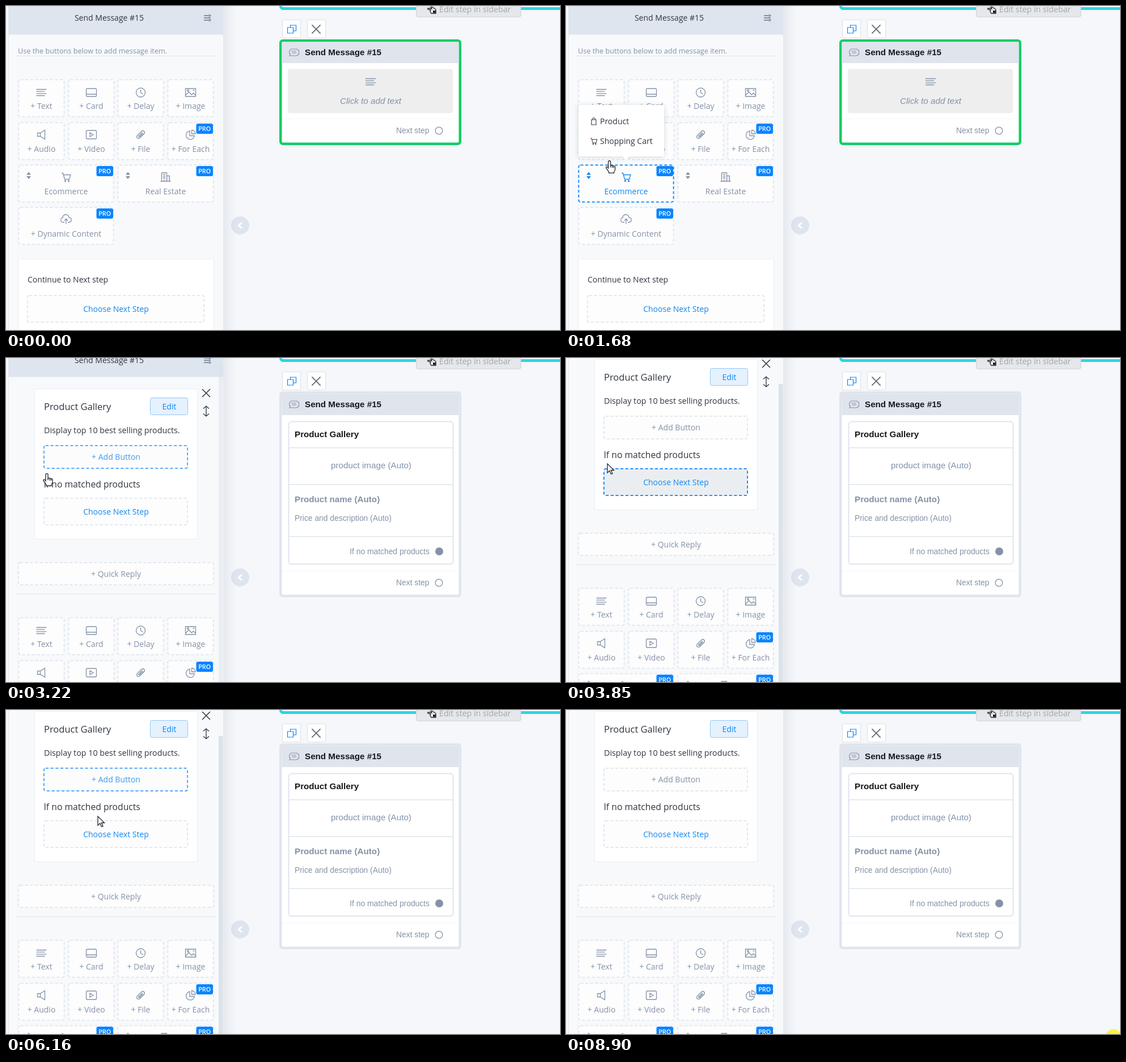
An HTML page with a canvas that plays this animation: 977x573 px, repeating every 8.97 s.

```html
<!DOCTYPE html>
<html>
<head>
<meta charset="utf-8">
<style>
html, body { margin: 0; width: 100%; height: 100%; overflow: hidden; background: #f5f7fa; }
canvas { display: block; }
</style>
</head>
<body>
<canvas id="stage" width="977" height="573"></canvas>
<script>
const c = document.getElementById('stage').getContext('2d');
const LOOP = 8970, SHIFT = 346;
const GRAY = '#8392a7', BLUE = '#0a84ff', LINK = '#0f87f0', DARK = '#2f3640', LINE = '#dfe5ee';
const SANS = '"Open Sans", sans-serif', ARIAL = '"Liberation Sans", Arial, sans-serif';

const ICONS = {
  text: 'M-9-5.5H9M-9-1.8H6M-9 1.8H9M-9 5.5H6',
  card: 'M-7-7H7Q9-7 9-5V5Q9 7 7 7H-7Q-9 7-9 5V-5Q-9-7-7-7ZM-9 3H9',
  delay: 'M8 0A8 8 0 1 1-8 0A8 8 0 1 1 8 0M0-5V0L4 3',
  image: 'M-9-7H9V7H-9ZM-9 5L-3-1L2 4L5 1L9 5M-3-3.5A1.5 1.5 0 1 1-6-3.5A1.5 1.5 0 1 1-3-3.5M4-4L7-4',
  audio: 'M-7-3H-2L6-8V8L-2 3H-7ZM-2-3V3',
  video: 'M-7-7.5H7Q9-7.5 9-5.5V5.5Q9 7.5 7 7.5H-7Q-9 7.5-9 5.5V-5.5Q-9-7.5-7-7.5ZM-2.5-3.5L3.5 0L-2.5 3.5Z',
  file: 'M5-1L-1 5.5Q-4 8-6 6Q-8 3.5-5.5 1L1.5-6Q4-8 6-6Q8-3.5 5.5-1L-1 5M3-4L-3.5 2.5Q-4 4-2.5 4L4-2.5',
  pie: 'M-1.5-6.5A7.5 7.5 0 1 0 7 2H-1.5ZM2-8V-1.5H8.5A6.5 6.5 0 0 0 2-8Z',
  cart: 'M-8-7H-5.5L-2.5 4H5.5L8-4H-4.5M-.5 7A1 1 0 1 1-2.5 7A1 1 0 1 1-.5 7M5.5 7A1 1 0 1 1 3.5 7A1 1 0 1 1 5.5 7',
  house: 'M-7 7.5V-7.5H2V7.5M2-2H7V7.5M-9 7.5H9M-4.5-4H-.5M-4.5-1H-.5M-4.5 2H-.5M-2.5 7V4.5M4.5 1V2M4.5 4V5',
  cloud: 'M-3 5H-5A4 4 0 0 1-6-3A5.5 5.5 0 0 1 5-3.5A4.2 4.2 0 0 1 5 5H3M0 8V-1M-3 2L0-1L3 2',
  bag: 'M-4-3H4V6H-4ZM-2-3V-5Q0-8 2-5V-3',
  cross: 'M-7-7L7 7M7-7L-7 7',
  updown: 'M0-9V9M-5-4.5L0-9L5-4.5M-5 4.5L0 9L5 4.5',
  menu: 'M-6-4H3M-6 0H6M-6 4H3M3-6L6-4L3-2M3 2L6 4L3 6',
  copy: 'M-2-3V-7H8V3H3M-7-3H3V7H-7Z',
  chat: 'M-3-6H3A5.5 5.5 0 0 1 3 6H-8L-6.5 3.5A5.5 5.5 0 0 1-3-6ZM-4-2H4M-4 1H4',
  chevron: 'M3-5L-2.5 0L3 5'
};
const HAND = new Path2D('M-2 1.5Q0-.8 2 1.5V9Q3.5 7.4 5 9Q6.5 8 7.5 9.7Q9 9 10 10.7V15Q10 18 8 20V22H-1V20Q-3 17-6 13Q-6.5 10.5-4 11L-2 13.5Z');
const ARROW = new Path2D('M0 0V16L3.8 12.4L6.5 18.5L9 17.4L6.3 11.5H11.5Z');
const POINT_LEFT = new Path2D('M-7-1Q-8-3-6-3L0-2L-2-5L1-5L7-1V6H-1L-3 3L-2 0Z');

// label, icon, x, y, width, has badge, has sort arrows
const TILES = [
  ['+ Text', 'text', 22, 130, 81], ['+ Card', 'card', 110, 130, 81],
  ['+ Delay', 'delay', 197, 130, 81], ['+ Image', 'image', 285, 130, 81],
  ['+ Audio', 'audio', 22, 206, 81], ['+ Video', 'video', 110, 206, 81],
  ['+ File', 'file', 197, 206, 81], ['+ For Each', 'pie', 285, 206, 81, 1],
  ['Ecommerce', 'cart', 22, 281, 168, 1, 1], ['Real Estate', 'house', 197, 281, 169, 1, 1],
  ['+ Dynamic Content', 'cloud', 22, 356, 168, 1]
];

// start, end, steps, from x, y, to x, y, hand while moving
const MOVES = [
  [210, 680, 7, 750, 541, 81, 345],
  [1460, 1980, 8, 81, 340, 72, 204, 1],
  [3850, 4160, 5, 73, 187, 160, 130],
  [6160, 6400, 4, 162, 188, 168, 242],
  [7900, 8590, 10, 240, 262, 965, 580]
];
const CLICKS = [[1140, 80, 346], [2600, 71, 205], [8900, 965.5, 579]];

const clamp = v => Math.min(1, Math.max(0, v));
// Rises from 0 to 1 in n visible steps between a and b
const steps = (t, a, b, n) => clamp(Math.floor((t - a) / (b - a) * (n - 1) + 1e-6) / (n - 1));
const pulse = (t, on, off) => clamp((t - on) / 160) * (1 - clamp((t - off) / 240));

function text(s, x, y, color = GRAY, size = 14, align = 'center', style = '', family = SANS) {
  c.font = `${style} ${size}px ${family}`;
  c.textAlign = align;
  c.fillStyle = color;
  c.fillText(s, x, y + size * .36);
}
const label = (s, x, y, color, size, align, style) => text(s, x, y, color, size, align, style, ARIAL);

function box(x, y, w, h, r, fill, stroke, lw = 1, dash = []) {
  const i = stroke ? lw / 2 : 0;
  c.beginPath();
  c.roundRect(x + i, y + i, w - 2 * i, h - 2 * i, r);
  if (fill) { c.fillStyle = fill; c.fill(); }
  if (stroke) {
    c.setLineDash(dash);
    c.strokeStyle = stroke; c.lineWidth = lw; c.stroke();
    c.setLineDash([]);
  }
}
const dashed = (x, y, w, h, color = LINE, fill = '#fdfdfe') => box(x, y, w, h, 3, fill, color, 1.8, [5.2, 3.5]);
const rect = (x, y, w, h, color) => { c.fillStyle = color; c.fillRect(x, y, w, h); };

function at(x, y, draw, k = 1) {
  c.save();
  c.translate(x, y);
  c.scale(k, k);
  draw();
  c.restore();
}
function icon(name, x, y, color = GRAY, lw = 1.3, k = 1) {
  at(x, y, () => {
    c.strokeStyle = color; c.lineWidth = lw;
    c.stroke(new Path2D(ICONS[name]));
  }, k);
}
function dot(x, y, r, fill, stroke) {
  c.beginPath();
  c.arc(x, y, r, 0, 7);
  if (fill) { c.fillStyle = fill; c.fill(); }
  if (stroke) { c.strokeStyle = stroke; c.lineWidth = 1.3; c.stroke(); }
}
function faded(alpha, draw) {
  if (alpha <= 0) return;
  c.save();
  c.globalAlpha = alpha;
  draw();
  c.restore();
}

function tile([name, ico, x, y, w, badge, sort], color, border) {
  const cx = x + w / 2;
  dashed(x - .5, y - .5, w + 1, 67, border);
  icon(ico, cx, y + (y > 200 ? 21.5 : 23), color);
  text(name, cx, y + 46.5, color);
  if (sort) {
    c.fillStyle = color;
    c.fill(new Path2D(`M${x + 14} ${y + 17.5}l4-5l4 5zM${x + 14} ${y + 20}l4 5l4-5z`));
  }
  if (badge) {
    box(x + w - 30.5, y + 2, 29.5, 18, 3, BLUE);
    text('PRO', x + w - 15.8, y + 11, '#fff', 10.8, 'center', '600');
  }
}

function tiles(shop) {
  rect(18, 88, 352, 1, LINE);
  TILES.forEach(t => tile(t, GRAY, LINE));
  faded(shop, () => tile(TILES[8], LINK, BLUE));
  box(21, 447, 346, 160, 2, '#fff', '#e9edf3');
  text('Continue to Next step', 38, 484, DARK, 14, 'left');
  dashed(37, 511, 313, 49);
  text('Choose Next Step', 194, 536, LINK);
}

function gallery(add, choose, tools) {
  box(50, 71, 288, 267, 2, '#fff', '#e9edf3');
  text('Product Gallery', 67, 103, DARK, 16.5, 'left', '500');
  box(254, 87, 67, 31, 3, '#e5f1fd', '#93c6f8');
  text('Edit', 288, 103, LINK);
  text('Display top 10 best selling products.', 67, 145, DARK, 14.3, 'left');
  dashed(66, 171, 255, 42);
  text('+ Add Button', 194, 192);
  faded(add, () => {
    dashed(66, 171, 255, 42, BLUE);
    text('+ Add Button', 194, 192, LINK);
  });
  text('If no matched products', 66.5, 240, DARK, 15.7, 'left');
  dashed(66, 264, 255, 49);
  faded(choose, () => dashed(66, 264, 255, 49, BLUE, '#ebeef1'));
  text('Choose Next Step', 194, 289, LINK);
  if (tools) {
    icon('cross', 353, 79, DARK, 1.5);
    icon('updown', 353, 111, DARK, 1.3);
  }
  dashed(21, 378, 346, 41);
  text('+ Quick Reply', 194, 399);
}

function popup(t) {
  c.shadowColor = 'rgba(60,75,95,.22)';
  c.shadowBlur = 9;
  c.shadowOffsetY = 1;
  box(22, 175, 151, 91, 2, '#fff');
  c.shadowColor = 'transparent';
  c.fillStyle = '#fff';
  c.fill(new Path2D('M100 266H112L106 272Z'));
  const product = steps(t, 1980, 2140, 3), alpha = c.globalAlpha;
  const row = (y, h) => { c.globalAlpha = alpha * h; rect(22, y, 151, 35, '#e5f2fe'); c.globalAlpha = alpha; };
  row(186, product);
  if (t >= 1820) row(221, 1 - product);
  icon('bag', 49, 204, product > .5 ? LINK : DARK, 1.1);
  text('Product', 60, 203.5, product > .5 ? LINK : DARK, 14, 'left');
  icon('cart', 49, 239, DARK, 1.4, .72);
  text('Shopping Cart', 60, 239, DARK, 14, 'left');
}

function sidebar(t, cursor) {
  const added = t >= 3220;
  const scroll = added ? 17 + 52 * steps(t, 3220, 3540, 5) : 0;
  const g = c.createLinearGradient(383, 0, 406, 0);
  g.addColorStop(0, 'rgba(90,110,140,.10)');
  g.addColorStop(1, 'rgba(90,110,140,0)');
  rect(383, 0, 23, 573, g);
  rect(4, 0, 379, 573, '#f7f9fb');
  rect(4, 0, 1, 573, '#e3e8ee');
  c.save();
  c.beginPath();
  c.rect(5, 0, 378, 573);
  c.clip();
  c.translate(0, -scroll);
  rect(5, 0, 378, 50.5, LINE);
  text('Send Message #15', 182, 21, DARK);
  icon('menu', 355, 21, '#66758a', 1.4);
  if (added) {
    const add = Math.max(t < 4000 ? .7 * (1 - clamp((t - 3220) / 240)) : 0, pulse(t, 4000, 6100));
    const choose = Math.max(pulse(t, 3380, 3860), pulse(t, 6240, 7900));
    gallery(add, choose, cursor.x < 338);
    c.translate(0, SHIFT);
  } else {
    text('Use the buttons below to add message item.', 21, 79, GRAY, 12.7, 'left');
  }
  tiles(pulse(t, 520, 2600));
  c.restore();
  if (added && cursor.x < 383) {
    faded(.5 + clamp((t - 3220) / 320) / 2, () => rect(375, scroll * .67, 7.5, 573, '#dce2ea'));
  }
  faded(clamp((t - 1220) / 240) * (1 - clamp((t - 2600) / 230)), () => popup(t));
}

function flow(t) {
  const added = t >= 3220;
  box(482, -60, 600, 67, 4, '#fdfdfe', '#30d3e5', 5);
  box(723, -20, 185.5, 40, 3, '#e5e7ea', '#cfd3d8');
  at(751, 7, () => {
    c.fillStyle = '#f4f4f5'; c.strokeStyle = '#20242a'; c.lineWidth = 1.3;
    c.fill(POINT_LEFT); c.stroke(POINT_LEFT);
    rect(2, 1, 5, 4, '#20242a');
  });
  text('Edit step in sidebar', 764, 5.5, '#a0a6af', 14.2, 'left');
  box(487, 24, 33, 33, 2, '#fff', '#dadfe6');
  box(531, 24, 33, 33, 2, '#fff', '#dadfe6');
  icon('copy', 503.5, 41, LINK, 1.2);
  icon('cross', 547, 41, '#5c636d', 1.5, 1.08);

  const bottom = added ? 423 : 246;
  box(482, 59, 321, bottom - 59, 4, '#fff', added ? LINE : '#10cd65', 4.5);
  rect(486.5, 63.5, 312, 37.5, '#dfe4ed');
  icon('chat', 508, 82, GRAY, 1.2);
  label('Send Message #15', 527, 82, '#15181c', 15.2, 'left', 'bold');
  if (added) {
    box(497.5, 111.5, 292, 254, 5, '#fff', LINE, 2);
    for (const y of [158, 223, 315]) rect(499, y, 289, 1.5, LINE);
    label('Product Gallery', 509, 135, '#15181c', 15.2, 'left', 'bold');
    label('product image (Auto)', 644, 190, GRAY, 15.2);
    label('Product name (Auto)', 509, 250, GRAY, 15.2, 'left', 'bold');
    label('Price and description (Auto)', 509, 283, GRAY, 13.85, 'left');
    label('If no matched products', 747, 342, GRAY, 13.85, 'right');
    dot(764, 342, 7, GRAY);
  } else {
    box(497, 111.5, 291, 78, 4, '#eeeeef');
    icon('text', 643, 134);
    label('Click to add text', 643, 168, GRAY, 15.2, 'center', 'italic');
  }
  rect(487, bottom - 47, 311, 1, '#f5f6f8');
  label('Next step', 746.5, bottom - 26, GRAY, 13.85, 'right');
  dot(763.5, bottom - 25.5, 6.3, '#fff', GRAY);

  dot(413, 388, 16, LINE);
  icon('chevron', 413, 388, '#fff', 3);
}

function cursorAt(t) {
  const m = MOVES.filter(m => t >= m[0]).pop();
  if (!m) return { x: 0, y: 0, hidden: true };
  const [a, b, n, x0, y0, x1, y1, hand] = m;
  const f = steps(t, a, b, n), e = 1 - (1 - f) ** 2;
  return {
    x: x0 + (x1 - x0) * e, y: y0 + (y1 - y0) * e,
    hand: hand || f === 1, hidden: t >= 8590
  };
}

function pointer(t, p) {
  for (const [start, x, y] of CLICKS) {
    const age = (t - start) / 320;
    if (age >= 0 && age < 1) faded(.85 * (1 - Math.floor(age * 4) / 4), () => dot(x, y, 14.5, '#fbf021'));
  }
  if (p.hidden) return;
  at(p.x, p.y, () => {
    const shape = p.hand ? HAND : ARROW;
    c.fillStyle = '#fff'; c.strokeStyle = '#22262c'; c.lineWidth = 1.3;
    c.fill(shape); c.stroke(shape);
    if (p.hand) c.stroke(new Path2D('M2 9V12M5 9.5V12.5M7.5 10V13'));
  });
}

function frame(now) {
  const t = now % LOOP, p = cursorAt(t);
  rect(0, 0, 977, 573, '#f5f7fa');
  flow(t);
  sidebar(t, p);
  pointer(t, p);
  requestAnimationFrame(frame);
}
requestAnimationFrame(frame);
</script>
</body>
</html>
```
